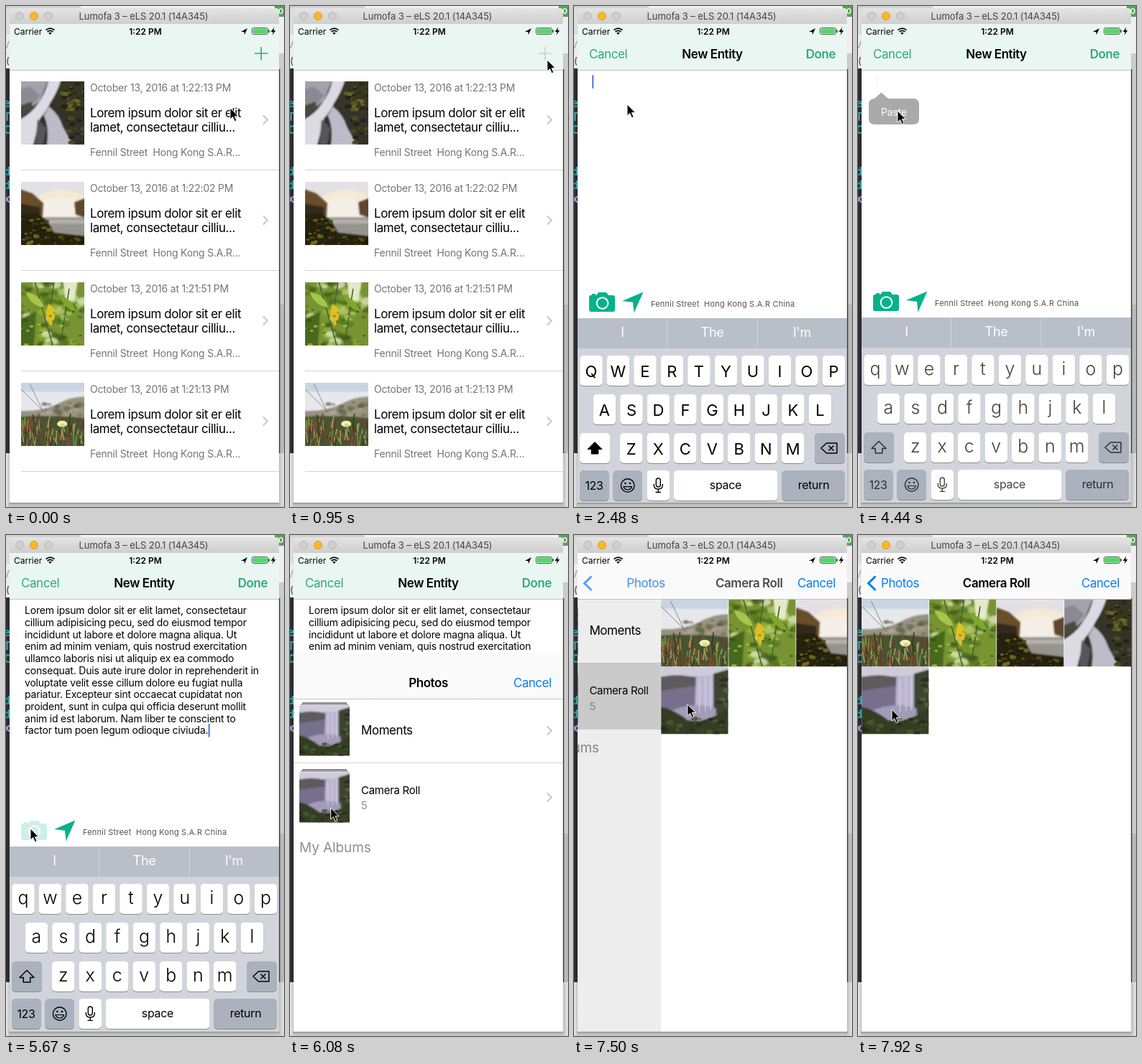
Write an HTML page that moves like this. It is 387 px wide and 698 px high and loops after 8000 ms.

```html
<!DOCTYPE html>
<html lang="en">
<head>
<meta charset="utf-8">
<title>New entity</title>
<style>
html, body { margin: 0; width: 100%; height: 100%; overflow: hidden; background: #ddd; }
svg { display: block; }
#stage { width: 387px; height: 698px; font-family: Inter, "Noto Sans", sans-serif; }
text { white-space: pre; }
</style>
</head>
<body>
<svg id="stage" viewBox="0 0 387 698"></svg>
<script>
const LOOP = 8000;
const GREEN = '#2fab7c', MINT = '#06b28a', BLUE = '#087cf5';
const PLACE = 'Fennil Street  Hong Kong S.A.R';
const TRACK = { 11: .2, 12: 0, 13: -.08, 14: -.2, 15: -.28, 16: -.32, 17: -.45, 18: -.3, 19: -.1 };

// ---------- markup helpers ----------
const text = (x, y, str, size, fill = '#000', attrs = '') =>
  `<text x="${x}" y="${y}" font-size="${size}" fill="${fill}" letter-spacing="${TRACK[size] || 0}" ${attrs}>${str}</text>`;
const MID = 'text-anchor="middle"', END = 'text-anchor="end"', BOLD = 'font-weight="600"';
const rect = (x, y, w, h, fill, attrs = '') =>
  `<rect x="${x}" y="${y}" width="${w}" height="${h}" fill="${fill}" ${attrs}/>`;
const path = (d, fill, attrs = '') => `<path d="${d}" fill="${fill}" ${attrs}/>`;
const line = (d, stroke, width = 1, attrs = '') =>
  path(d, 'none', `stroke="${stroke}" stroke-width="${width}" ${attrs}`);
const group = (id, body, attrs = '') => `<g id="${id}" ${attrs}>${body}</g>`;
const gradient = (id, from, to, axis = 'x2="0" y2="1"') =>
  `<linearGradient id="${id}" ${axis}><stop stop-color="${from}"/><stop offset="1" stop-color="${to}"/></linearGradient>`;
const photo = (id, x, y, size) => `<use href="#${id}" x="${x}" y="${y}" width="${size}" height="${size}"/>`;
const chevron = (x, y) => line(`M${x - 3} ${y - 6}l6 6l-6 6`, '#c7c7cc', 2);

// ---------- pictures: soft shapes with seeded texture ----------
function random(seed) {
  return () => (seed = (seed * 16807) % 2147483647) / 2147483647;
}
function blobs(seed, n, x, y, w, h, size, colors) {
  const r = random(seed);
  let out = '';
  for (let i = 0; i < n; i++) {
    const s = size * (.5 + r());
    out += `<ellipse cx="${(x + r() * w).toFixed(1)}" cy="${(y + r() * h).toFixed(1)}" rx="${s.toFixed(1)}" ry="${(s * .6).toFixed(1)}" fill="${colors[i % colors.length]}" opacity=".75"/>`;
  }
  return out;
}
function blades(seed, n, y, h, colors) {
  const r = random(seed);
  let out = '';
  for (let i = 0; i < n; i++) {
    const bx = r() * 100, by = y + r() * h;
    out += line(`M${bx.toFixed(1)} ${by.toFixed(1)}l${(r() * 8 - 4).toFixed(1)} ${(-8 - r() * 12).toFixed(1)}`, colors[i % colors.length], 1.8);
  }
  return out;
}
// soft parts are blurred together, crisp parts lie on top
const picture = (id, base, soft, crisp) =>
  `<symbol id="${id}" viewBox="0 0 100 100"><g filter="url(#soft)">${rect(-10, -10, 120, 120, base)}${soft}</g>${crisp}</symbol>`;

const pictures =
  picture('stream', '#34322a',
    path('M-5 -5H44L30 30L-5 60Z', '#a3a2aa') +
    path('M-5 14L14 8L30 22L16 40L-5 44Z', '#8b8a92') +
    path('M44 -5H64Q58 16 46 34Q40 48 30 58L18 105H-5V62Q16 52 26 36Q40 18 44 -5Z', '#dcdbe4') +
    path('M44 40Q60 52 66 72L84 105H40Q46 76 36 54Z', '#bdbbc8') +
    path('M64 -5H105V50Q78 54 52 36Z', '#383520') +
    path('M-5 40L16 32L20 44L-5 58Z', '#4a4a40') +
    path('M26 60L40 74L34 105H22Z', '#55545a'),
    blobs(7, 30, 64, 2, 36, 46, 4, ['#5d6420', '#26241a', '#6e6f2a', '#1d1c17']) +
    blobs(3, 22, 72, 54, 28, 44, 4, ['#4c5420', '#1f1d15', '#38361f'])) +
  picture('falls', '#e4e1e6',
    path('M14 34Q54 -2 105 24V50H14Z', '#f6ead4') +
    path('M-5 10L18 18L36 34V58H-5Z', '#6a4d2c') +
    path('M-5 34L30 40V62H-5Z', '#33291a') +
    path('M36 28Q66 20 88 30V58H34Z', '#f3eee6') +
    path('M84 32L105 24V58L86 52Z', '#5f472d') +
    path('M30 56H105V90H40Z', '#97948f') +
    path('M34 60H105V66H40Z', '#b5b1ac') +
    path('M-5 52L26 50L42 62L52 80L105 86V105H-5Z', '#25230f'),
    blobs(11, 46, 0, 58, 44, 42, 3.4, ['#777a1e', '#1d190c', '#8a7024', '#454d16', '#201d0e']) +
    blobs(5, 20, 44, 86, 56, 14, 3, ['#5a5218', '#1d190c'])) +
  picture('leaf', '#789430',
    blobs(23, 60, 0, 0, 100, 100, 7, ['#547a22', '#b9cd76', '#38561a', '#94b33a', '#e2e9c4', '#456a1c']) +
    path('M-5 60L24 46L20 105H-5Z', '#47691f') +
    path('M66 -5H90L84 30L70 26Z', '#e4eac8'),
    line('M22 0L50 100M52 0L46 42M76 10L62 100', '#486526', 1.8) +
    path('M44 34Q56 40 53 56L47 70Q38 56 40 44Z', '#dfbf22') +
    path('M60 20Q80 26 88 48Q68 42 60 20Z', '#7da82b') +
    path('M8 16Q30 18 36 40Q14 36 8 16Z', '#a6c54a') +
    blobs(29, 26, 0, 40, 100, 60, 3, ['#33511a', '#a9c452', '#65892a'])) +
  picture('dune', '#c9d4e3',
    rect(-10, 14, 120, 40, '#e6e8ec') +
    path('M-5 44Q30 46 56 34Q80 20 105 22V105H-5Z', '#999282') +
    blobs(31, 26, 34, 32, 66, 26, 5, ['#6c6f4a', '#b5aa98', '#595d3c']) +
    path('M-5 54Q50 50 105 56V105H-5Z', '#4a5430'),
    blades(17, 100, 66, 42, ['#7f8f3c', '#74352b', '#303c1e', '#9aa25c', '#8d4a38']) +
    line('M0 10L40 50M14 2L36 48', '#666f68', .8) +
    `<ellipse cx="65" cy="65" rx="8" ry="5" fill="#f0edb8"/><ellipse cx="66" cy="67" rx="4" ry="2.2" fill="#dfd472"/>`) +
  picture('gorge', '#8a84a0',
    rect(-10, -10, 120, 24, '#cfccda') +
    path('M-5 16Q24 8 52 16V40L-5 46Z', '#5e5a5c') +
    path('M-5 36L52 28V72H-5Z', '#776f8c') +
    path('M52 15L80 11V68L50 74Z', '#bdb6d2') +
    path('M78 10L105 2V90L78 66Z', '#3c4530') +
    path('M14 66Q48 50 82 62V84H14Z', '#a39bb8') +
    path('M-5 58Q22 64 40 80Q66 86 105 58V105H-5Z', '#323c22'),
    line('M57 18V68M66 16V66M74 14V64', '#d6d0e6', 2, 'opacity=".6"') +
    blobs(41, 34, 0, 76, 100, 24, 4, ['#232b16', '#4f5a30', '#3d4826']) +
    blobs(13, 14, 84, 14, 16, 50, 4, ['#566040', '#2b331f']));

// ---------- desktop and window frame ----------
const code = [['e', 141], ['T', 160], ['C', 178], ['d', 236], ['d', 255], ['x', 274]]
  .map(([c, y], i) => `<text x="-3" y="${y}" font-family="DejaVu Sans Mono, monospace" font-weight="700" font-size="15" fill="${i < 5 ? '#35a3a6' : '#a99bd0'}">${c}</text>`).join('');
const desktop =
  rect(0, 0, 387, 698, '#dcdcdc') + rect(0, 0, 104, 3, '#d2d2d2') + rect(104, 0, 270, 3, '#f2f2f2') +
  rect(0, 40, 5, 47, '#ececec') + text(-4, 59, 'V', 13, '#999') + text(0, 81, '(', 13, '#333') +
  rect(0, 87, 5, 536, '#2d2d30') + code +
  rect(380, 15, 7, 51, '#efefef') + rect(380, 66, 7, 350, '#cbcbcb') + rect(380, 416, 7, 207, '#b9b9b9') +
  rect(380, 88, 1.5, 535, '#444') + rect(374, 0, 13, 15, '#53a653') + text(379, 11, '0', 11, '#fff', BOLD) +
  rect(0, 623, 5, 75, 'url(#shadowLeft)') + rect(380, 623, 7, 75, 'url(#shadowRight)') + rect(4, 692, 377, 6, 'url(#shadowBase)') +
  path('M5 25V7Q5 3 9 3H376Q380 3 380 7V25Z', 'url(#chrome)') +
  `<g stroke-width="1"><circle cx="19" cy="14" r="5.5" fill="#cfcfcf" stroke="#b5b5b5"/>
   <circle cx="39" cy="14" r="5.5" fill="#fbb829" stroke="#dd9c1f"/>
   <circle cx="59" cy="14" r="5.5" fill="#cfcfcf" stroke="#b5b5b5"/></g>` +
  text(191.5, 19, 'Lumofa 3 – eLS 20.1 (14A345)', 13, '#444', MID);

const status =
  text(11, 39.5, 'Carrier', 12) +
  line('M55.5 33.6Q61.5 28.6 67.5 33.6M57.6 36Q61.5 32.8 65.4 36', '#000', 1.7) + path('M59.3 37.6Q61.5 35.8 63.7 37.6L61.5 40Z', '#000') +
  text(194, 39.5, '1:22 PM', 12, '#000', `${MID} ${BOLD}`) +
  path('M327 36L336 31L332 40L331.4 36Z', '#000') +
  rect(342.5, 30.5, 22, 9, '#fff', 'rx="2" stroke="#333" stroke-width=".8"') + rect(343.5, 31.5, 20, 7, '#4cd964', 'rx="1"') +
  rect(365.4, 33, 1.4, 4, '#333', 'rx=".6"') +
  path('M373.4 29.5L368.8 36H371.8L370.6 40.5L375.4 34H372.4Z', '#000');

// ---------- entity list ----------
const rows = [['stream', '1:22:13'], ['falls', '1:22:02'], ['leaf', '1:21:51'], ['dune', '1:21:13']].map(([pic, time], i) =>
  `<g transform="translate(0 ${i * 140})">` + photo(pic, 21, 105, 88) +
  text(117, 118.5, `October 13, 2016 at ${time} PM`, 14, '#747474') +
  text(117, 155, 'Lorem ipsum dolor sit er elit', 17) +
  text(117, 175, 'lamet, consectetaur cilliu...', 17) +
  text(117, 209, PLACE + '...', 14, '#747474') +
  chevron(361, 158.5) + rect(21, 228, 359, 1, '#d4d4d6') + '</g>').join('');

// ---------- editor page ----------
const copy = `Lorem ipsum dolor sit er elit lamet, consectetaur
cillium adipisicing pecu, sed do eiusmod tempor
incididunt ut labore et dolore magna aliqua. Ut
enim ad minim veniam, quis nostrud exercitation
ullamco laboris nisi ut aliquip ex ea commodo
consequat. Duis aute irure dolor in reprehenderit in
voluptate velit esse cillum dolore eu fugiat nulla
pariatur. Excepteur sint occaecat cupidatat non
proident, sunt in culpa qui officia deserunt mollit
anim id est laborum. Nam liber te conscient to
factor tum poen legum odioque civiuda.`.split('\n')
  .map((s, i) => text(26, 110.3 + i * 16.7, s, 14)).join('');

const cameraIcon =
  path('M23 402H25V400H30V402H31L34 398H45L48 402H54Q57 402 57 405V422Q57 425 54 425H24Q21 425 21 422V405Q21 402 23 402Z', MINT) +
  '<circle cx="39.5" cy="413" r="7.8" fill="none" stroke="#fff" stroke-width="2"/>';
const tools = rect(5, 392, 375, 42, '#fff') + group('camera', cameraIcon) +
  path('M67 410L96.5 397.5L83.5 426.5L82 411.8Z', MINT) +
  text(107, 417.5, PLACE + ' China', 11, '#555');

const key = (x, y, w, fill = '#fff') =>
  rect(x, y + 1, w, 42, '#888b90', 'rx="5"') + rect(x, y, w, 42, fill, 'rx="5"');
const ROWS = [['QWERTYUIOP', 8.2, 486], ['ASDFGHJKL', 26.7, 540], ['ZXCVBNM', 64, 594]];
const eachKey = fn => ROWS.map(([s, x, y]) => [...s].map((c, i) => fn(c, x + i * 37.5, y)).join('')).join('');
const shiftArrow = 'M29 606.5L39 616.5H33.8V623H24.2V616.5H19Z';
const SPECIAL = '#abb2bd';
const keyboard =
  rect(5, 434, 375, 258, '#d1d5db') + rect(5, 434, 375, 42, '#b8bfc9') +
  rect(129, 435, 1, 40, '#d0d5dc') + rect(254.5, 435, 1, 40, '#d0d5dc') +
  ['I', 'The', "I'm"].map((s, i) => text(67.5 + i * 125, 460, s, 18, '#fff', MID)).join('') +
  eachKey((c, x, y) => key(x, y, 31.5)) +
  key(335, 594, 42, SPECIAL) + key(8, 646, 40.5, SPECIAL) + key(54.5, 646, 40.5, SPECIAL) +
  key(101.5, 646, 31.5) + key(139, 646, 144.5) + key(289.5, 646, 87.5, SPECIAL) +
  group('caps', key(8, 594, 42) + path(shiftArrow, '#000', 'stroke="#000" stroke-linejoin="round"') +
    eachKey((c, x, y) => text(x + 15.75, y + 29.5, c, 22, '#000', MID))) +
  group('small', key(8, 594, 42, SPECIAL) + group('smallInk', line(shiftArrow, '#000', 1.5, 'stroke-linejoin="round"') +
    eachKey((c, x, y) => text(x + 15.75, y + 28, c.toLowerCase(), 25, '#000', `${MID} font-weight="300"`)))) +
  group('ink',
    line('M344 615L351.5 608H366V622H351.5Z', '#000', 1.5, 'stroke-linejoin="round"') + line('M354.5 611.5l7 7m0 -7l-7 7', '#000', 1.5) +
    text(28, 673, '123', 16, '#000', MID) +
    '<circle cx="74.7" cy="667" r="9.3" fill="none" stroke="#000" stroke-width="1.4"/><circle cx="71.4" cy="664" r="1.3"/><circle cx="78" cy="664" r="1.3"/>' +
    line('M69 668.5H80.4Q79 673 74.7 673Q70.4 673 69 668.5Z', '#000', 1.2) +
    rect(114.3, 657, 6, 12, 'none', 'rx="3" stroke="#000" stroke-width="1.4"') +
    line('M111.3 665V666.5Q111.3 672 117.3 672Q123.3 672 123.3 666.5V665M117.3 672V676M113.6 676.4H121', '#000', 1.4) +
    text(211, 672, 'space', 16, '#000', MID) + text(333.5, 672, 'return', 16, '#000', MID));

const popup =
  path('M23 129L32.5 120.5L42 129H77Q85 129 85 137V157Q85 165 77 165H23Q15 165 15 157V137Q15 129 23 129Z', '#262626') +
  text(50, 153, 'Paste', 14, '#fff', MID);

// ---------- picture chooser ----------
const stack = y => rect(17, y, 62, 1.4, '#4b5361') + rect(15, y + 2, 66, 1.4, '#8d8796') + photo('gorge', 13, y + 4, 70);
const albums =
  rect(5, 90, 375, 602, '#fff') + group('press', rect(5, 179, 375, 92, '#d9d9d9')) +
  stack(94.5) + text(99, 139, 'Moments', 17) + chevron(361, 133.5) + rect(5, 178, 375, 1, '#d4d4d6') +
  stack(187.5) + text(99, 222, 'Camera Roll', 15) + text(99, 243.5, '5', 15, '#8e8e93') + chevron(361, 226.5) +
  text(13, 303, 'My Albums', 19, '#8e8e93');
const grid = rect(5, 90, 375, 602, '#fff') +
  ['dune', 'leaf', 'falls', 'stream', 'gorge'].map((p, i) => photo(p, 5 + i % 4 * 94, 90 + (i >> 2) * 94, 93.2)).join('');
const title = (id, s) => group(id, text(192.5, 73, s, 17, '#000', `${MID} ${BOLD}`));
const navBar = fill => rect(5, 25, 375, 64, fill) + rect(5, 89, 375, 1, '#bcc4c1');
const shade = id => group(id, rect(5, 90, 375, 602, '#000'));

const stage = document.getElementById('stage');
stage.innerHTML =
  `<defs>${gradient('chrome', '#e4e4e4', '#cecece')}${gradient('shadowBase', '#a6a6a6', '#cfcfcf')}
   ${gradient('shadowLeft', '#ebebeb', '#c2c2c2', '')}${gradient('shadowRight', '#bdbdbd', '#e6e6e6', '')}
   <filter id="soft" x="0" y="0" width="1" height="1"><feGaussianBlur stdDeviation="1.4"/></filter>
   <clipPath id="screen"><rect x="5" y="25" width="375" height="667"/></clipPath>${pictures}</defs>` + desktop +
  `<g clip-path="url(#screen)">` +
    rect(5, 25, 375, 667, '#fff') + group('list', rows) + shade('listShade') +
    group('editor', rect(5, 90, 375, 602, '#fff') + group('copy', copy) +
      group('caret', rect(-.2, 0, 2, 18.5, '#4c72dd'))) +
    group('board', tools + keyboard) + group('popup', popup) +
    navBar('#eaf6f1') + group('plus', line('M346 66H364.5M355.25 57V75.5', GREEN, 1.7)) +
    group('editorNav', text(21, 73, 'Cancel', 17, GREEN) + text(364, 73, 'Done', 17, GREEN, `${END} ${BOLD}`)) +
    title('editorTitle', 'New Entity') +
    group('modal', group('albums', albums) + shade('albumShade') + group('grid', grid) + navBar('#fafafa') +
      text(364, 73, 'Cancel', 17, BLUE, END) + title('albumTitle', 'Photos') + title('gridTitle', 'Camera Roll') +
      group('back', line('M24.5 57.5L14.5 67.2L24.5 77', BLUE, 3)) + group('backLabel', text(32, 73, 'Photos', 17, BLUE))) +
    status + `</g>` + line('M5 692.5H380', '#8f8f8f') +
  group('pointer', path('M0 0V16L3.7 12.6L6.4 18.8L9 17.6L6.4 11.6H11.4Z', '#000', 'stroke="#fff" stroke-linejoin="round"'));

const el = {};
stage.querySelectorAll('g[id]').forEach(g => el[g.id] = g);
const lastLine = el.copy.lastElementChild;

// ---------- motion ----------
const clamp = v => Math.min(1, Math.max(0, v));
const ramp = (t, a, b) => clamp((t - a) / (b - a));
// critically damped system spring
const spring = (t, start) => {
  const w = Math.max(0, t - start) * .01826;
  return 1 - (1 + w) * Math.exp(-w);
};
const move = (id, x, y) => el[id].setAttribute('transform', `translate(${x.toFixed(2)} ${y.toFixed(2)})`);
const fade = (id, o) => {
  el[id].setAttribute('opacity', o.toFixed(3));
  el[id].style.display = o > 0 ? '' : 'none';
};

const POINTER = [
  [50, 312, 142], [830, 358, 75], [1130, 358, 75], [1250, 350, 72], [1400, 350, 72], [1760, 110, 120],
  [2000, 110, 120], [2450, 74, 137], [2500, 74, 137], [2780, 64, 128], [2900, 62, 128], [3610, 62, 128],
  [4090, 55, 146], [4560, 55, 146], [5130, 58, 320], [5500, 34, 409], [5900, 34, 409],
  [6600, 171, 235], [7400, 171, 235], [7900, 47, 243]
];
function pointerAt(t) {
  const i = POINTER.findIndex(k => k[0] > t);
  if (i < 1) return (i ? POINTER[POINTER.length - 1] : POINTER[0]).slice(1);
  const [a, x0, y0] = POINTER[i - 1], [b, x1, y1] = POINTER[i];
  const u = ramp(t, a, b), e = u * u * (3 - 2 * u);
  return [x0 + (x1 - x0) * e, y0 + (y1 - y0) * e];
}
const blink = t =>
  ramp(t, 2000, 2060) - ramp(t, 3100, 3220) + ramp(t, 3600, 3680) - ramp(t, 4360, 4445) +
  ramp(t, 4499, 4500) - ramp(t, 5190, 5270) + ramp(t, 5500, 5580);

function draw(t) {
  move('pointer', ...pointerAt(t));

  const push = spring(t, 1100), pasted = t >= 4500, small = t >= 4400;
  move('list', -112.5 * push, 0);
  fade('listShade', .1 * push);
  move('editor', 375 * (1 - push), 0);
  fade('plus', (t >= 890 ? .3 : 1) * (1 - clamp(push * 1.2)));
  fade('editorNav', clamp(push * 1.1 - .05));
  fade('editorTitle', push);
  move('editorTitle', 165 * (1 - push), 0);

  const rise = spring(t, 2050);
  fade('board', t > 2050 ? 1 : 0);
  move('board', 0, 305 * (1 - rise));
  fade('caps', small ? 0 : 1);
  fade('small', small ? 1 : 0);
  const ink = small ? .65 + .35 * ramp(t, 4400, 4560) : 1;
  fade('smallInk', ink);
  fade('ink', ink);
  fade('popup', ramp(t, 3600, 3780) * (1 - ramp(t, 4380, 4480)));
  fade('copy', pasted ? 1 : 0);
  fade('caret', clamp(blink(t)));
  if (pasted) move('caret', 26.5 + lastLine.getComputedTextLength(), 263);
  else move('caret', 25.5, 96.3);
  fade('camera', 1 - .8 * ramp(t, 5600, 5660));

  fade('modal', t > 5900 ? 1 : 0);
  move('modal', 0, 667 * (1 - spring(t, 5920)));

  const open = spring(t, 7370);
  fade('press', t >= 7320 ? 1 : 0);
  move('albums', -112.5 * open, 0);
  fade('albumShade', .1 * open);
  move('grid', 375 * (1 - open), 0);
  move('albumTitle', -134 * open, 0);
  fade('albumTitle', 1 - clamp(open * 1.3));
  move('gridTitle', 165 * (1 - open), 0);
  fade('gridTitle', open);
  fade('back', open);
  move('backLabel', 134 * (1 - open), 0);
  fade('backLabel', open);
}

const begin = performance.now();
function tick() {
  draw((performance.now() - begin) % LOOP);
  requestAnimationFrame(tick);
}
draw(0);
requestAnimationFrame(tick);
</script>
</body>
</html>
```
